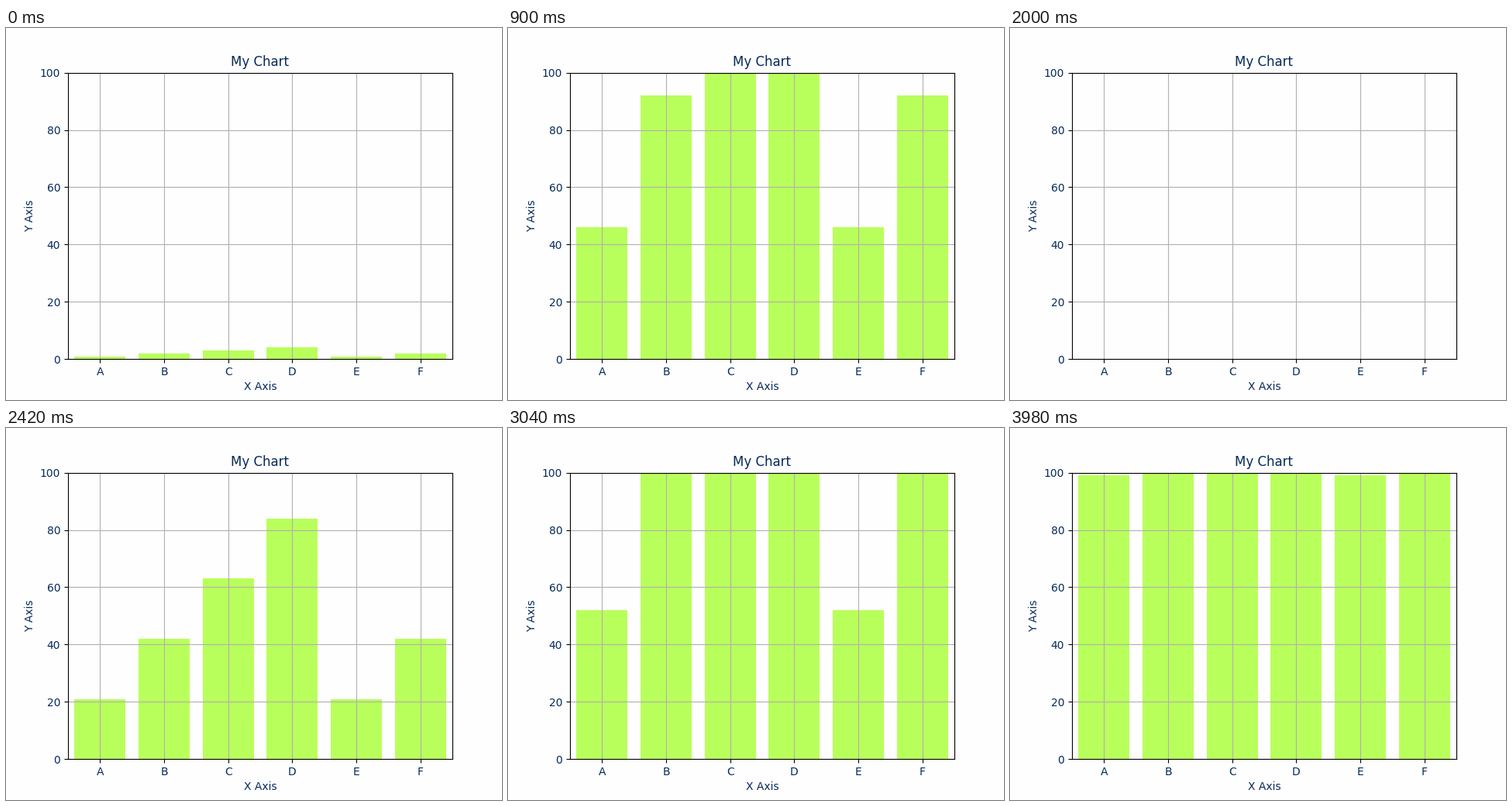
A matplotlib script that plays this animation: 640 px wide and 480 px high, repeating every 4000 ms.

```python
import matplotlib.pyplot as plt
from matplotlib.animation import FuncAnimation

FRAMES = 200
INTERVAL = 20
NAVY = "#05295a"
LIME = "#b9ff5c"
PAPER = "#fefefe"

LABELS = "ABCDEF"
SPEEDS = [1, 2, 3, 4, 1, 2]

plt.rcParams.update({
    "font.family": "DejaVu Sans",
    "text.color": NAVY,
    "axes.labelcolor": NAVY,
    "xtick.labelcolor": NAVY,
    "ytick.labelcolor": NAVY,
    "figure.facecolor": PAPER,
    "axes.facecolor": PAPER,
})

fig, ax = plt.subplots(figsize=(6.4, 4.8), dpi=100)
bars = ax.bar(range(len(LABELS)), SPEEDS, color=LIME)
ax.set_xticks(range(len(LABELS)), list(LABELS))
ax.set_xlim(-0.5, len(LABELS) - 0.5)
ax.set_ylim(0, 100)
ax.set_title("My Chart")
ax.set_xlabel("X Axis")
ax.set_ylabel("Y Axis")
ax.grid(True)


def update(frame):
    # The count runs 0..100, then drops back to zero.
    count = (frame + 1) % 101
    for bar, speed in zip(bars, SPEEDS):
        bar.set_height(speed * count)
    return list(bars)


def reset():
    return update(0)


anim = FuncAnimation(fig, update, frames=FRAMES, init_func=reset,
                     interval=INTERVAL, repeat=True, repeat_delay=0)
plt.show()
```
